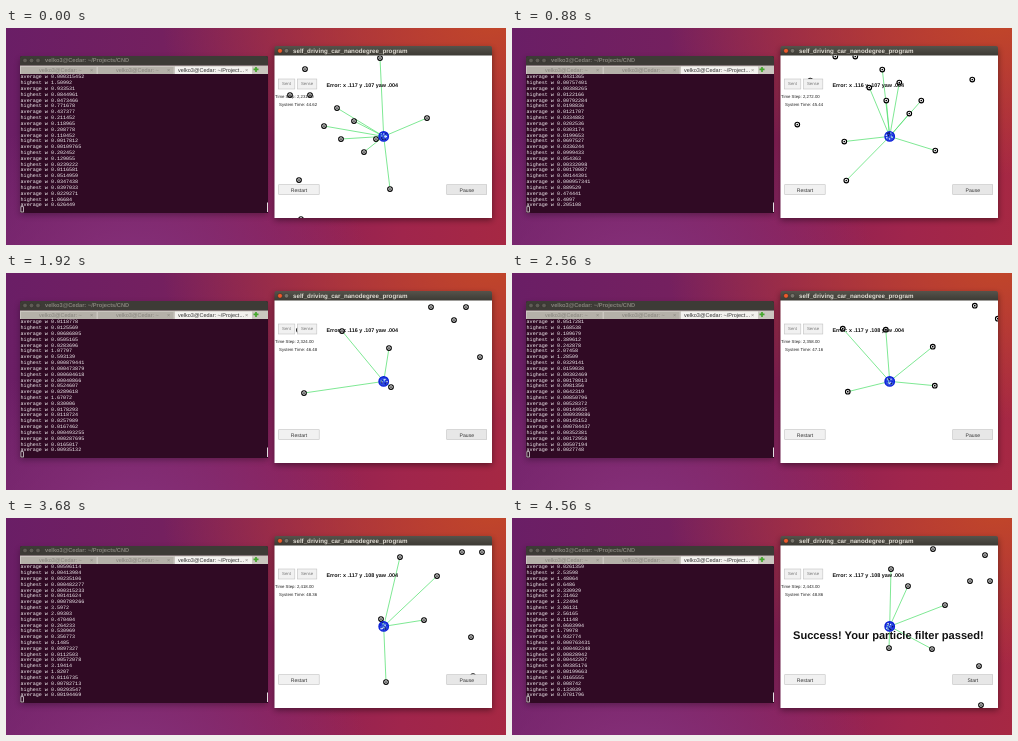
An HTML page for the animation above (4.64 s loop, 500 by 217 pixels).

```html
<!DOCTYPE html>
<html lang="en">
<head>
<meta charset="utf-8">
<title>Particle filter run</title>
<style>
  html, body { margin: 0; width: 100%; height: 100%; overflow: hidden; }
  body {
    background:
      radial-gradient(ellipse at 97% 0, #c0452a 0, #c0452a00 48%),
      radial-gradient(ellipse at 25% 110%, #86307a 0, #86307a00 45%),
      linear-gradient(97deg, #6a1e66 0, #74205f 30%, #8a2056 55%, #a0254c 80%, #a62843 100%);
  }
  svg { display: block; width: 100vw; height: 100vh; }
  text { font-family: "Liberation Sans", Arial, sans-serif; text-rendering: geometricPrecision; white-space: pre; }
  .b { font-weight: bold; }
  .mono text { font: 5.05px "Liberation Mono", monospace; fill: #f4f0f3; }
  .tab { font-size: 5.5px; fill: #85827b; }
  .info { font-size: 4.32px; fill: #222; }
  .btn rect { fill: #f1f1f1; stroke: #c2c2c2; stroke-width: .6; }
  .btn text { font-size: 5.1px; fill: #333; text-anchor: middle; }
  .btn .small { font-size: 4.3px; fill: #777; }
  .ray { stroke: #55e070; stroke-width: .75; }
</style>
</head>
<body>
<svg viewBox="0 0 500 217" preserveAspectRatio="none">
  <defs>
    <linearGradient id="bar" x2="0" y2="1">
      <stop stop-color="#56534b"/><stop offset="1" stop-color="#3b3933"/>
    </linearGradient>
    <clipPath id="view"><rect x="268.5" y="27.5" width="217.5" height="162.5"/></clipPath>
    <filter id="soft" x="-10%" y="-10%" width="120%" height="120%"><feGaussianBlur stdDeviation="3"/></filter>
    <g id="mark">
      <circle r="2.3" fill="#fff" stroke="#000" stroke-width="1.15"/>
      <circle r=".85"/>
    </g>
  </defs>

  <!-- terminal -->
  <rect x="14" y="31" width="248" height="156" fill="#000" opacity=".3" filter="url(#soft)"/>
  <path d="M14 185V30q0-2 2-2H260q2 0 2 2V185z" fill="#300a24"/>
  <path d="M14 37.500V30q0-2 2-2H260q2 0 2 2v7.500z" fill="#3d3b36"/>
  <g fill="#5f5c55" stroke="#2c2a26" stroke-width=".5">
    <circle cx="19" cy="32.500" r="2.300"/><circle cx="25.500" cy="32.500" r="2.300"/><circle cx="32" cy="32.500" r="2.300"/>
  </g>
  <text class="b" x="39" y="34.400" font-size="5.700" fill="#85827a">velko3@Cedar: ~/Projects/CND</text>
  <rect x="14" y="37.500" width="248" height="8.500" fill="#cbc7c0"/>
  <path d="M15 46v-7h75.500v7zM92 46v-7h75.500v7z" fill="#b5b1a9"/>
  <path d="M169 46v-7.500h77v7.500z" fill="#f3f1ee"/>
  <text class="tab" x="33" y="43.600">velko3@Cedar: ~</text>
  <text class="tab" x="110" y="43.600">velko3@Cedar: ~</text>
  <text class="tab" x="172" y="43.600" style="fill:#333">velko3@Cedar: ~/Project...</text>
  <text class="tab" x="84" y="43.600">×</text>
  <text class="tab" x="161" y="43.600">×</text>
  <text class="tab" x="239" y="43.600">×</text>
  <path d="M250 38.900v5M247.500 41.400h5" stroke="#45a82d" stroke-width="1.700"/>
  <g id="log" class="mono"></g>
  <rect x="14.900" y="178.700" width="2.700" height="5.300" fill="none" stroke="#eee" stroke-width=".7"/>
  <rect x="261" y="174.500" width="1" height="9.500" fill="#e4dfe2"/>

  <!-- simulator -->
  <rect x="268.500" y="21" width="217.500" height="171" fill="#000" opacity=".45" filter="url(#soft)"/>
  <path d="M268.500 28V20q0-2 2-2H484q2 0 2 2v8z" fill="url(#bar)"/>
  <g fill="#77746b" stroke="#2c2a26" stroke-width=".5">
    <circle cx="274" cy="22.800" r="2.400" fill="#ee5a2c"/><circle cx="280.500" cy="22.800" r="2.300"/>
  </g>
  <text class="b" x="287" y="24.900" font-size="6.200" fill="#dfdbd2">self_driving_car_nanodegree_program</text>
  <rect x="268.500" y="27.500" width="217.500" height="162.500" fill="#fff"/>
  <g clip-path="url(#view)">
    <g id="rays"></g>
    <g id="marks"></g>
    <g transform="translate(377.700 108.400)">
      <circle r="4.700" fill="#2f4be0" stroke="#0a1fd8" stroke-width="1.400"/>
      <g id="specks"></g>
    </g>
  </g>
  <g class="btn">
    <rect x="272.300" y="51" width="16.500" height="10"/><text class="small" x="280.500" y="57.400">Sent</text>
    <rect x="291.300" y="51" width="19.500" height="10"/><text class="small" x="301" y="57.400">Sense</text>
    <rect x="272.700" y="156.700" width="40.500" height="9.800"/><text x="293" y="163.500">Restart</text>
    <rect x="440.700" y="156.700" width="40" height="9.800" style="fill:#e7e7e7"/><text id="run" x="460.800" y="163.500">Pause</text>
  </g>
  <text id="error" class="b" x="320.400" y="58.600" font-size="5.420" fill="#111"></text>
  <text id="step" class="info" x="269" y="70"></text>
  <text id="time" class="info" x="273" y="78"></text>
  <text id="done" class="b" x="281" y="121.200" font-size="11.100" fill="#111">Success! Your particle filter passed!</text>
</svg>
<script>
const LOOP = 4640, TICK = 80, END = 2443, RANGE = 83, ROWS = 23;
const CAR = { x: 377.7, y: 108.4 };

// time in ms, step count, map shift x and y
const route = [
  [0, 2231, 0, 0], [480, 2251, 20, -18], [1200, 2288, 54, -53], [1920, 2324, 90, -77],
  [3120, 2388, 156, -63], [3680, 2418, 172, -33], [4160, END, 174, -4]
];
const landmarks = [
  [299, 41], [374, 30], [421, 90], [331, 80], [348, 93], [318, 98], [335, 111], [358, 124],
  [370, 111], [384, 161], [293, 152], [295, 191], [284, 67], [304, 67], [259, 91], [246, 135],
  [208, 197], [203, 134], [222, 72], [205, 55], [247, 35]
];

const $ = id => document.getElementById(id);
const set = (el, attrs) => { for (const k in attrs) el.setAttribute(k, attrs[k]); };
const add = (parent, tag, attrs) => {
  const el = document.createElementNS("http://www.w3.org/2000/svg", tag);
  set(el, attrs);
  return parent.appendChild(el);
};
const rand = n => { const v = Math.sin(n * 12.9898) * 43758.5453; return v - Math.floor(v); };

const rows = Array.from({ length: ROWS }, (_, i) => add($("log"), "text", { x: 14.6, y: 50.2 + i * 5.83 }));
const rays = landmarks.map(() => add($("rays"), "line", { class: "ray", x1: CAR.x, y1: CAR.y }));
const marks = landmarks.map(() => add($("marks"), "use", { href: "#mark" }));
const tints = ["#0b1450", "#e4ecff", "#0a1fd8", "#7fc8d8"];
const specks = Array.from({ length: 16 }, (_, i) => add($("specks"), "circle", { r: .75, fill: tints[i % 4] }));

function stepAt(t) {
  const i = route.findIndex(p => p[0] > t);
  if (i < 0) return END;
  const a = route[i - 1], b = route[i];
  return Math.round(a[1] + (b[1] - a[1]) * (t - a[0]) / (b[0] - a[0]));
}

const slope = (i, c) => (route[i + 1][c] - route[i][c]) / (route[i + 1][1] - route[i][1]);
function tangent(i, c) {
  if (i === 0) return slope(0, c);
  if (i === route.length - 1) return slope(i - 1, c);
  const before = route[i][1] - route[i - 1][1], after = route[i + 1][1] - route[i][1];
  return (slope(i - 1, c) * after + slope(i, c) * before) / (before + after);
}
// smooth curve through the route, by step
function shift(step, c) {
  let i = 0;
  while (i < route.length - 2 && route[i + 1][1] <= step) i++;
  const a = route[i], b = route[i + 1], h = b[1] - a[1], u = (step - a[1]) / h, v = 1 - u;
  return (1 + 2 * u) * v * v * a[c] + u * v * v * h * tangent(i, c)
    + u * u * (3 - 2 * u) * b[c] - u * u * v * h * tangent(i + 1, c);
}

// each step prints its highest, then its average weight; back counts up from the newest line
function logLine(step, back) {
  const n = step - (back >> 1), top = 10 ** (rand(n) * 4 - 3.4);
  const weight = v => String(+v.toPrecision(6));
  return back % 2 ? "highest w " + weight(top) : "average w " + weight(top * (.48 + .2 * rand(n + .5)));
}

function draw(t) {
  const step = stepAt(t), dx = shift(step, 2), dy = shift(step, 3);
  landmarks.forEach(([lx, ly], i) => {
    const x = lx + dx, y = ly + dy;
    const near = Math.hypot(x - CAR.x, y - CAR.y) < RANGE;
    set(marks[i], { x, y });
    set(rays[i], { x2: x, y2: y, visibility: near ? "visible" : "hidden" });
  });
  specks.forEach((el, i) => {
    const turn = rand(step + i * 7.3) * 2 * Math.PI, far = 3.6 * Math.sqrt(rand(step + i * 3.1));
    set(el, { cx: far * Math.cos(turn), cy: far * Math.sin(turn) });
  });
  rows.forEach((row, i) => row.textContent = logLine(step, ROWS - 1 - i));

  const ex = t >= 240 && t < 2560 ? ".116" : ".117", ey = t < 2560 ? ".107" : ".108";
  $("error").textContent = `Error: x ${ex} y ${ey} yaw .004`;
  $("step").textContent = `Time Step: ${step.toLocaleString("en-US")}.00`;
  $("time").textContent = `System Time: ${(step * .02).toFixed(2)}`;
  const over = step >= END;
  $("run").textContent = over ? "Start" : "Pause";
  set($("done"), { visibility: over ? "visible" : "hidden" });
}

let last = -1;
function loop() {
  const frame = Math.floor(performance.now() % LOOP / TICK);
  if (frame !== last) draw((last = frame) * TICK);
  requestAnimationFrame(loop);
}
loop();
</script>
</body>
</html>
```
